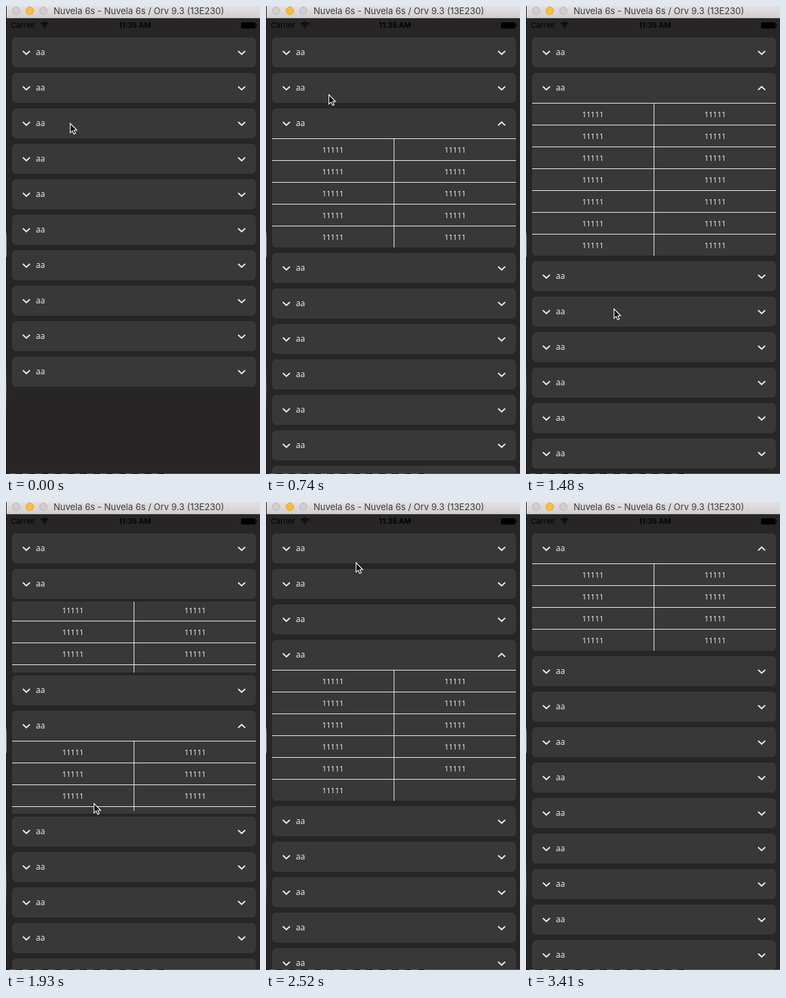
Write an HTML page that moves like this. It is 374 px wide and 686 px high and loops after 4.08 s.

```html
<!DOCTYPE html>
<html lang="en">
<head>
<meta charset="utf-8">
<title>Accordion list</title>
<style>
  html, body { margin: 0; width: 100%; height: 100%; overflow: hidden; background: #272525; }
  #stage { position: relative; width: 374px; height: 686px; overflow: hidden; background: #272525;
    --bg: #272525; --card: #383838; --ink: #e9e9e9; color: #f4f4f4; font-family: "Open Sans", "Noto Sans", sans-serif; }
  #chrome, #cursor { position: absolute; left: 0; top: 0; }
  #list { position: absolute; left: 0; top: 0; width: 374px; height: 685px; overflow: hidden; }
  .section { position: absolute; left: 9px; top: 0; width: 359px; }
  .head { position: absolute; top: -4px; width: 100%; height: 52px; background: var(--bg); }
  .card { position: absolute; top: 4px; width: 100%; height: 44px; border-radius: 6px; background: var(--card);
    font-size: 12px; line-height: 43px; text-indent: 35px; }
  .card svg { position: absolute; left: 15px; top: 19px; }
  .card svg + svg { left: 332px; }
  .open .head { height: 48px; }
  .open .card { border-radius: 6px 6px 0 0; }
  .open .card svg + svg { transform: scaleY(-1); }
  .body { position: absolute; top: 44px; width: 100%; overflow: hidden; background: var(--card); }
  .settled .body { border-radius: 0 0 6px 6px; }
  .row { display: flex; box-sizing: border-box; height: 32px; border-top: 1px solid var(--ink);
    font-size: 11px; line-height: 31px; text-align: center; }
  .row span { width: 179px; }
  .row span + span { margin-left: 1px; }
  .divider { position: absolute; left: 179px; top: 0; width: 1px; background: var(--ink); }
  #edge { position: absolute; left: 0; top: 0; width: 1px; height: 686px;
    background: linear-gradient(#1b171d 328px, #8d8b8f 338px, #9a989b 366px, #1b171d 370px, #1b171d 520px, #57545a 560px, #1b171d 600px); }
  #floor { position: absolute; left: 0; top: 685px; width: 374px; height: 1px;
    background: linear-gradient(90deg, transparent 235px, #5c5a5c 235px),
      repeating-linear-gradient(90deg, #151416 0 5px, #6e6c6e 5px 14px, #2a282a 14px 19px); }
</style>
</head>
<body>
<div id="stage">
  <svg id="chrome" width="374" height="40">
    <defs>
      <linearGradient id="bar" x2="0" y2="1">
        <stop stop-color="#e3e1e3"/><stop offset="1" stop-color="#d0ced0"/>
      </linearGradient>
    </defs>
    <rect x="1" width="373" height="18" fill="url(#bar)"/>
    <rect x="1" y="17" width="373" height="1" fill="#b3b1b3"/>
    <g stroke-width="1">
      <circle cx="15" cy="7" r="5.5" fill="#cfcdcf" stroke="#b9b7b9"/>
      <circle cx="35" cy="7" r="5.5" fill="#fdbe2f" stroke="#e2a325"/>
      <circle cx="55" cy="7" r="5.5" fill="#cfcdcf" stroke="#b9b7b9"/>
    </g>
    <g font-family="Inter, Roboto, sans-serif">
      <text x="70" y="12" font-size="13" fill="#3b393b">Nuvela 6s - Nuvela 6s / Orv 9.3 (13E230)</text>
      <text x="7" y="32" font-size="11">Carrier</text>
      <text x="190" y="32" font-size="11" font-weight="600" text-anchor="middle">11:35 AM</text>
    </g>
    <g fill="none" stroke="#000" stroke-width="1.7">
      <path d="M51.3 26.6a8.2 8.2 0 0 1 11.4 0M53.5 29a5 5 0 0 1 7 0"/>
      <path d="M55.2 30.8a2.6 2.6 0 0 1 3.6 0L57 32.6z" fill="#000" stroke="none"/>
    </g>
    <rect x="346" y="24" width="21.5" height="9" rx="2"/>
    <rect x="368.3" y="27" width="1.4" height="3" rx=".7"/>
  </svg>
  <div id="list"></div>
  <div id="edge"></div>
  <div id="floor"></div>
  <svg id="cursor" width="12" height="18">
    <path d="M.6 1V14.8L3.8 11.9 6 16.7 8.3 15.7 6.2 11H10.4Z" fill="#000" stroke="#fff" stroke-width="1.1"/>
  </svg>
</div>
<script>
const LOOP = 4080, ROW = 32, PITCH = 52, TOP = 46, COUNT = 10;
const items = [8, 14, 10, 11];          // cells inside the first four sections
const moves = [                         // each move opens one section and closes the last
  { at: 12, dur: 350, open: 2 },
  { at: 797, dur: 350, open: 1 },
  { at: 1755, dur: 334, open: 3 },
  { at: 2795, dur: 352, open: 0 }
];
// screen refreshes: time, pointer x, pointer y (no pointer: hidden)
const ticks = [
  [0, 94, 171], [150, 94, 171], [300, 94, 171], [450, 93, 143], [590, 92, 132], [740, 92, 129],
  [890, 92, 129], [1030, 92, 129], [1180, 94, 163], [1330, 118, 380], [1480, 129, 443],
  [1780, 129, 442], [1930, 129, 441], [2080, 132, 433], [2230, 145, 219], [2370, 132, 93],
  [2520, 132, 88], [2660, 132, 73], [2810, 132, 73], [2960, 132, 73], [3110, 132, 75],
  [3260, 266, 368], [3410]
];

const list = document.getElementById('list');
const cursor = document.getElementById('cursor');
const chevron = '<svg width="12" height="7"><path d="M.8 1 6 5.8 11.2 1" fill="none" stroke="#e9e9e9" stroke-width="1.9"/></svg>';
const ease = u => u * u * (3 - 2 * u);
const fullHeight = i => Math.ceil((items[i] || 0) / 2) * ROW;

function makeSection(i) {
  const el = document.createElement('div');
  const cell = n => `<span>${n < items[i] ? '11111' : ''}</span>`;
  let rows = '';
  for (let n = 0; n < (items[i] || 0); n += 2) rows += `<div class="row">${cell(n)}${cell(n + 1)}</div>`;
  el.innerHTML = `<div class="body">${rows}<div class="divider"></div></div>
    <div class="head"><div class="card">${chevron}${chevron}aa</div></div>`;
  list.append(el);
  return { el, body: el.querySelector('.body'), divider: el.querySelector('.divider') };
}
const sections = Array.from({ length: COUNT }, (_, i) => makeSection(i));

function render(t) {
  const k = moves.filter(m => m.at <= t).length - 1;
  const move = moves[k], last = moves[k - 1];
  let p = move ? ease(Math.min(1, (t - move.at) / move.dur)) : 0;
  if (p > 0.995) p = 1;
  let y = TOP;
  sections.forEach(({ el, body, divider }, i) => {
    const open = !!move && move.open === i;
    const closing = !!last && last.open === i && p < 1;
    const settled = open && p === 1;
    const h = Math.round(fullHeight(i) * (open ? p : closing ? 1 - p : 0));
    el.className = 'section' + (open ? ' open' : '') + (settled ? ' settled' : '');
    el.style.transform = `translateY(${y}px)`;
    body.style.display = h > 1 ? 'block' : 'none';
    body.style.height = h + (settled ? 0 : 4) + 'px';
    divider.style.height = h + (closing ? 4 : 0) + 'px';
    y += PITCH + h;
  });
}

let shown = null;
function frame(now) {
  const t = now % LOOP;
  const tick = ticks.filter(k => k[0] <= t).pop();
  if (tick !== shown) {
    shown = tick;
    const [at, x, y] = tick;
    render(at);
    cursor.style.display = x === undefined ? 'none' : 'block';
    cursor.style.transform = `translate(${x || 0}px, ${y || 0}px)`;
  }
}
const start = performance.now();
function run() {
  frame(performance.now() - start);
  requestAnimationFrame(run);
}
run();
</script>
</body>
</html>
```
